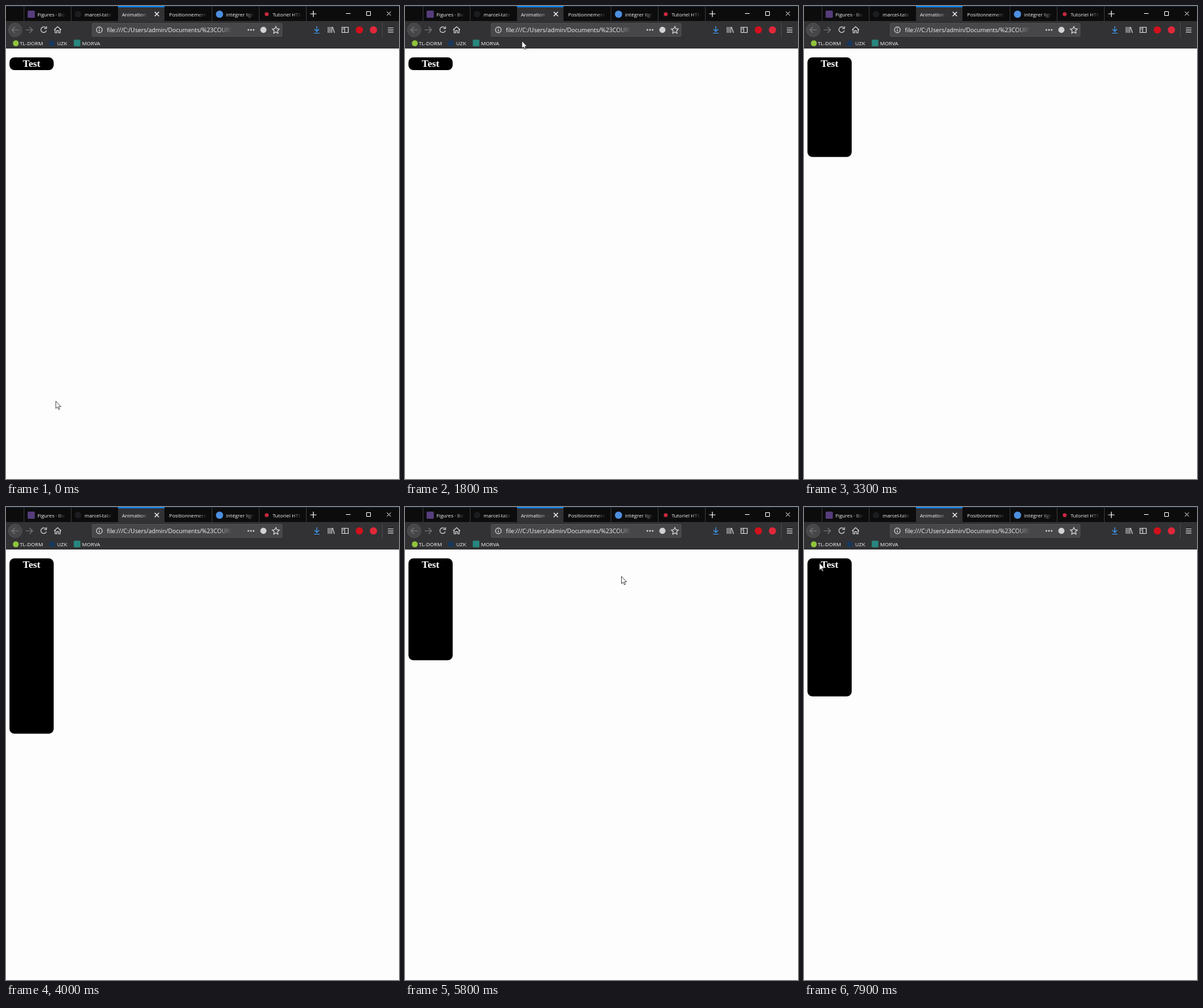
An HTML page for the animation above (8000 ms loop, 600 px wide and 723 px high).

```html
<!DOCTYPE html>
<html lang="fr">
<head>
<meta charset="utf-8">
<title>Animation</title>
<style>
html, body { margin: 0; width: 100%; height: 100%; overflow: hidden; background: #fefdfe; }
#stage { display: block; font-family: "Open Sans", "Noto Sans", sans-serif; fill: #f4f4f5; }
.tab { font-size: 7.7px; }
.mark { font-size: 8px; }
.line { fill: none; stroke: #d2d2d4; stroke-width: 1.2; }
.dim { stroke: #77777a; }
#label { font: bold 15.5px "Liberation Serif", "Times New Roman", serif; fill: #fff; text-anchor: middle; }
</style>
</head>
<body>
<svg id="stage" width="600" height="723" viewBox="0 0 600 723">
  <defs>
    <linearGradient id="fadeDark"><stop stop-color="#0c0c0d" stop-opacity="0"/><stop offset="1" stop-color="#0c0c0d"/></linearGradient>
    <linearGradient id="fadeTab"><stop stop-color="#323234" stop-opacity="0"/><stop offset="1" stop-color="#323234"/></linearGradient>
    <linearGradient id="fadeField"><stop stop-color="#474749" stop-opacity="0"/><stop offset="1" stop-color="#474749"/></linearGradient>
  </defs>

  <rect width="600" height="24" fill="#0c0c0d"/>
  <rect width="600" height="1" fill="#10243c"/>
  <rect y="23" width="600" height="42" fill="#323234"/>
  <path d="M27.5 1V23M99.5 1V23M314.5 1V23M386.5 1V23M458.5 1V23" stroke="#38383b"/>
  <rect x="171" width="71" height="24" fill="#323234"/>
  <rect x="171" width="71" height="2" fill="#0a84ff"/>
  <g id="tabs"></g>

  <!-- tab icons and window buttons -->
  <rect x="33" y="7" width="11" height="11" rx="1.5" fill="#563d7c"/>
  <circle cx="110" cy="12.5" r="5" fill="#1b1d20"/>
  <circle cx="326" cy="12.5" r="5.5" fill="#4d8fe0"/>
  <circle cx="398" cy="12.5" r="3" fill="#c9283e"/>
  <g class="line" style="stroke:#f4f4f5">
    <path d="M227 9l6.5 6.5M233.500 9l-6.500 6.500M464.500 12H474M469.250 7.250V16.750"/>
    <path d="M519 11.500H526M550.500 8.500h6v6h-6ZM581.500 8.500l6 6M587.500 8.500l-6 6" stroke-width="1"/>
  </g>

  <!-- navigation -->
  <circle cx="14" cy="36.500" r="10.500" fill="#474749" stroke="#58585b" stroke-width=".7"/>
  <path class="line dim" d="M19.500 36.500H9M13.500 32l-4.500 4.500 4.500 4.500M30 36.500H40.500M36 32l4.500 4.500-4.500 4.500"/>
  <g class="line">
    <path d="M60.800 33.300A4.300 4.300 0 1 0 61.700 37.500M61.800 31V34.500H58.200"/>
    <path d="M73.500 36.500l5.300-5 5.300 5M75 35.500V41h2.500V37.500h2.600V41h2.500V35.500"/>
  </g>
  <rect x="131.500" y="26.500" width="290" height="20" rx="1.500" fill="#474749" stroke="#555558" stroke-width=".8"/>
  <circle class="line" cx="142.500" cy="36.500" r="4.300" stroke-width="1"/>
  <path class="line" d="M142.500 36V39M142.500 33.800V35"/>
  <svg x="154" y="27" width="191" height="19">
    <text y="13" font-size="9">file:///C:/Users/admin/Documents/%23COURS</text>
    <rect x="171" width="20" height="19" fill="url(#fadeField)"/>
  </svg>
  <g fill="#d2d2d4">
    <circle cx="370" cy="36.500" r="1.300"/><circle cx="374" cy="36.500" r="1.300"/><circle cx="378" cy="36.500" r="1.300"/>
    <circle cx="393" cy="36.500" r="4.700"/>
  </g>
  <path class="line" d="M412 31.300l1.600 3.400 3.700.5-2.700 2.600.7 3.700-3.300-1.800-3.300 1.800.7-3.700-2.700-2.600 3.700-.5Z" stroke-width="1"/>
  <path class="line" d="M474.500 31V38.500M471 35.500l3.500 3.500 3.500-3.500M470.300 41.500H478.700" style="stroke:#3d9df5"/>
  <path class="line" d="M492 32V41M494.700 32V41M497.400 32V41M498.500 32l3 9"/>
  <path class="line" d="M513 32.500H522.500V40.500H513ZM517 32.500V40.500M514 35H516"/>
  <circle cx="539.500" cy="36.500" r="5.500" fill="#d4101c"/>
  <circle cx="561" cy="36.500" r="5.500" fill="#e0283a"/>
  <path d="M574.500 25V48" stroke="#4b4b4e"/>
  <path class="line" d="M583 33.500H591.500M583 36.700H591.500M583 39.900H591.500"/>

  <!-- bookmarks -->
  <circle cx="15" cy="57" r="4.500" fill="#8fc43c"/>
  <circle cx="70" cy="57" r="4.500" fill="#17385c"/>
  <rect x="103.500" y="51.500" width="10" height="10" rx="1" fill="#27877f"/>
  <g class="mark">
    <text x="21" y="59.500">TL-DORM</text>
    <text x="78" y="59.500">UZK</text>
    <text x="116" y="59.500">MORVA</text>
  </g>

  <rect id="box" x="5.300" y="78.500" width="67.500" rx="7.500" fill="#000"/>
  <text id="label" x="39" y="93.300">Test</text>
  <path id="arrow" d="M0 0V11.200L2.600 8.900 4.300 12.800 6 12.100 4.300 8.300H7.800Z" fill="#fff" stroke="#26262b" stroke-width=".8"/>
  <path id="beam" d="M-2-5.500H2M0-5.500V5.500M-2 5.500H2" stroke="#000" fill="none"/>
</svg>
<script>
const $ = id => document.getElementById(id);

// text left, text right, title
const tabs = [
  [48, 91, "Figures · Bootstrap"],
  [120, 163, "marcel-tabi"],
  [177, 219, "Animation | CSS"],
  [249, 306, "Positionnement CSS"],
  [336, 379, "intégrer ligne"],
  [407, 451, "Tutoriel HTML"]
];
$("tabs").innerHTML = tabs.map(([x, end, title], i) => `
  <svg x="${x}" y="3" width="${end - x}" height="19">
    <text class="tab" y="12.500">${title}</text>
    <rect x="${end - x - 14}" width="14" height="19" fill="url(#${i === 2 ? "fadeTab" : "fadeDark"})"/>
  </svg>`).join("");

// CSS "ease": cubic-bezier(.25, .1, .25, 1)
function ease(x) {
  if (x <= 0) return 0;
  if (x >= 1) return 1;
  let lo = 0, hi = 1, s;
  for (let i = 0; i < 24; i++) {
    s = (lo + hi) / 2;
    if (.75 * s * (1 - s) + s ** 3 < x) lo = s; else hi = s;
  }
  return .3 * s * (1 - s) ** 2 + 3 * s * s * (1 - s) + s ** 3;
}

// hover transitions: start, duration, bottom edge from, to
const moves = [
  [2530, 3000, 98, 411.5],
  [4865, 2920, 402, 98],
  [6960, 2760, 115, 411.5]
];
// pointer: time, x, y
const path = [
  [0, 76, 604], [900, 252, 370], [1000, 252, 371], [1300, 252, 371],
  [1800, 178.5, 53.5], [2200, 147, 80], [2530, 72, 88], [2700, 55, 90],
  [4700, 55, 90], [4865, 73, 88], [4900, 127.5, 86], [5800, 330.5, 106],
  [6700, 181, 102], [6960, 72, 92], [7000, 51, 90], [7600, 23.5, 85.5], [8000, 23.5, 85.5]
];

function bottom(t) {
  const m = moves.filter(m => m[0] <= t).pop();
  return m ? m[2] + (m[3] - m[2]) * ease((t - m[0]) / m[1]) : 98;
}

function pointer(t) {
  const i = path.findIndex(p => p[0] > t);
  const [a, b] = [path[i - 1], path[i]];
  const k = (t - a[0]) / (b[0] - a[0]);
  return [a[1] + (b[1] - a[1]) * k, a[2] + (b[2] - a[2]) * k];
}

function draw(now) {
  const t = Math.floor(now % 8000 / 100) * 100;
  const [x, y] = pointer(t);
  const overText = x > 24.5 && x < 56 && y > 79 && y < 98;
  $("box").setAttribute("height", bottom(t) - 78.5);
  for (const [id, shown] of [["arrow", !overText], ["beam", overText]]) {
    $(id).setAttribute("transform", `translate(${x} ${y})`);
    $(id).setAttribute("visibility", shown ? "visible" : "hidden");
  }
  requestAnimationFrame(draw);
}
draw(0);
</script>
</body>
</html>
```
